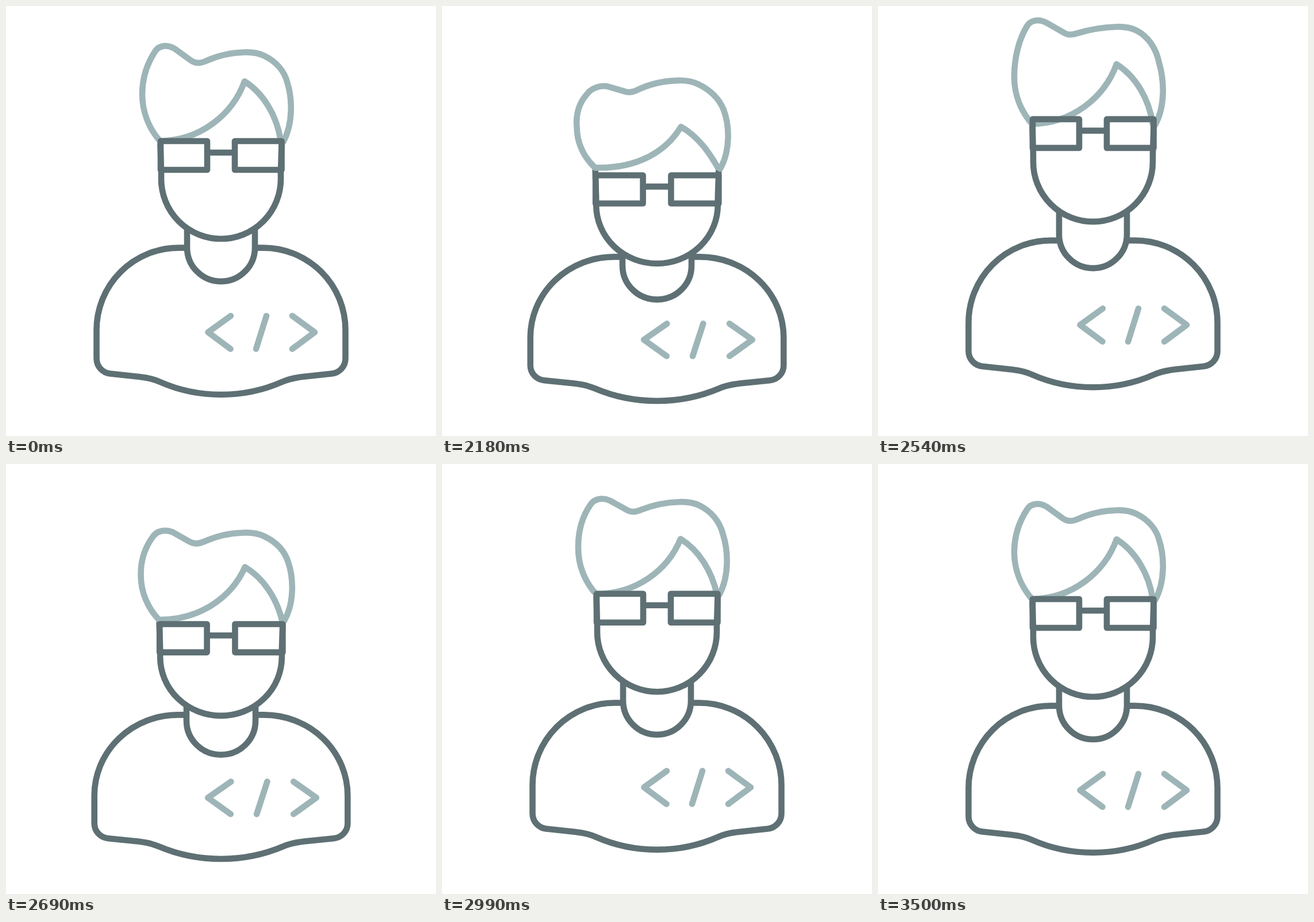
An HTML page that plays this animation: 748x748 px, repeating every 3530 ms.

```html
<!DOCTYPE html>
<html lang="en">
<head>
<meta charset="utf-8">
<title>Developer avatar</title>
<style>
  html, body { margin: 0; width: 100%; height: 100%; overflow: hidden; background: #fff; }
  svg { display: block; width: 100%; height: 100%; }
  path { fill: none; stroke: #5e7074; stroke-width: 10.6; stroke-linecap: round; stroke-linejoin: round; vector-effect: non-scaling-stroke; }
  .light { stroke: #9eb5b8; }
  #face { fill: #fff; }
</style>
</head>
<body>
<svg viewBox="0 0 748 748">
  <g id="body">
    <path d="M313 420.600H300.500A143 143 0 0 0 157.500 563.600V613C157.500 627 168 638 181 639.500L232 645C245 646.500 257 649 268 654C302 669 338 676 374 676C410 676 446 669 480 654C491 649 503 646.500 516 645L567 639.500C580 638 590.500 627 590.500 613V563.600A143 143 0 0 0 447.500 420.600H435"/>
    <path class="light" d="M391 539L351.500 567.500L390.500 596.500M453 539L435 596.500M498 539L537 567.500L498 596.500"/>
  </g>
  <path id="neck"/>
  <g id="head">
    <path id="face" d="M268.500 240L270 288V301a104 104 0 0 0 208 0V288L479.500 240"/>
    <path id="hair" class="light" d="M268,235C248,212 237,183 237,153C237,124 246,99 260,78C267,68 281,67 293,74L322,95C329,100 338,100 347,96C369,86 392,81 415,80.5C428,80 440,82 450,87C470,97 484,113 489,132C498,160 500,204 482,237"/>
    <path id="fringe" class="light" d="M268,235C338,234 394,189 415,131C448,152 471,190 478,235"/>
    <path id="glasses" d="M269 235H350V285H269ZM398 235H479.500V285H398ZM350 255H398"/>
  </g>
</svg>
<script>
const LOOP = 3530, START = 2030, STEP = 30;

// Turning points as [step, offset]: the body's hop, and how far the head trails it
const HOP = [[0, 0], [3, 18], [13, -16], [16, -16], [26, 18], [34, -6], [40, 4], [50, 0]];
const TRAIL = [[0, 0], [6, 32], [14, -22], [16, -22], [27, 40], [34, -6], [40, 0]];

const [body, neck, head, hair, fringe, glasses] =
  ['body', 'neck', 'head', 'hair', 'fringe', 'glasses'].map(id => document.getElementById(id));
const hairPath = hair.getAttribute('d');
const fringePath = fringe.getAttribute('d');

const clamp = v => Math.min(1, Math.max(0, v));
const smooth = v => clamp(v) ** 2 * (3 - 2 * clamp(v));
const bump = (x, mid, width) => Math.exp(-(((x - mid) / width) ** 2));

// Sine easing from one turning point to the next
function swing(keys, t) {
  const i = keys.findIndex(key => key[0] > t);
  if (i < 1) return i ? keys[keys.length - 1][1] : 0;
  const [t0, a] = keys[i - 1], [t1, b] = keys[i];
  return a + (b - a) * (1 - Math.cos(Math.PI * (t - t0) / (t1 - t0))) / 2;
}

const warp = (d, move) => d.replace(/([\d.]+),([\d.]+)/g, (_, x, y) =>
  move(+x, +y).map(v => v.toFixed(2)).join());

// The crown stretches upward; the quiff sags when flat
const bendHair = (flat, stretch) => (x, y) => {
  const top = smooth((150 - y) / 60);
  const sag = 38 * bump(x, 262, 45) * clamp((235 - y) / 150);
  const rise = top * (17 + 8 * bump(x, 333, 25));
  return [x - 8 * flat * top, y + flat * sag - stretch * rise];
};

const bendFringe = flat => (x, y) => {
  const s = Math.sqrt(clamp((235 - y) / 104));
  return [x - 40 * flat * s * (1 - s), y + 45 * flat * s];
};

const squash = (base, dy, sx, sy) =>
  `translate(374 ${base + dy}) scale(${sx} ${sy}) translate(-374 ${-base})`;

function draw(step) {
  const trail = delay => swing(TRAIL, step - delay);
  const hop = swing(HOP, step);
  const press = Math.max(0, hop / 15) ** 1.5;
  const sx = 1 + .028 * press, sy = 1 - .03 * press;
  const headY = hop + trail(0);
  const neckY = hop + .65 * trail(-.3);
  const flat = Math.max(0, trail(1.5) / 39);
  const stretch = Math.max(0, -hop / 15);

  body.setAttribute('transform', squash(676, hop, sx, sy));
  head.setAttribute('transform', squash(405, headY, sx, sy));
  glasses.setAttribute('transform', `translate(0 ${.43 * trail(.5)})`);
  neck.setAttribute('transform', squash(479, 0, sx, 1));
  neck.setAttribute('d', `M315 ${382 + headY}V${420 + neckY}a59 59 0 0 0 118 0V${382 + headY}`);
  hair.setAttribute('d', warp(hairPath, bendHair(flat, stretch)));
  fringe.setAttribute('d', warp(fringePath, bendFringe(flat)));
}

const begin = performance.now();
function tick() {
  const t = (performance.now() - begin) % LOOP;
  draw(t < START ? 0 : Math.floor((t - START) / STEP) + 1);
  requestAnimationFrame(tick);
}
tick();
</script>
</body>
</html>
```
